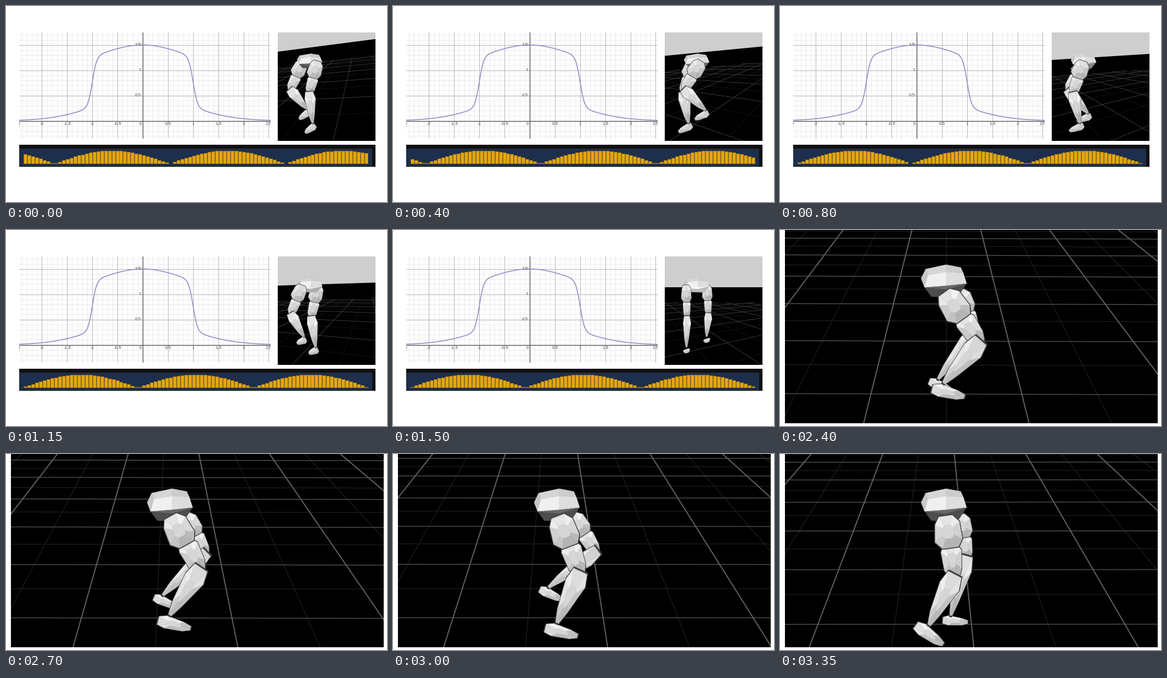
Animation of 694 by 356 pixels, one loop 3.4 s. Source, as a matplotlib script:

```python
import numpy as np
import matplotlib.pyplot as plt
from matplotlib.animation import FuncAnimation
from matplotlib.collections import LineCollection, PolyCollection
from matplotlib.patches import Rectangle

W, H, DPI = 694, 356, 100
FRAMES, STEP, CUT = 68, 50, 1700
PT = 72 / DPI

plt.rcParams["font.family"] = "Liberation Sans"
fig = plt.figure(figsize=(W / DPI, H / DPI), dpi=DPI, facecolor="white")
ax = fig.add_axes([0, 0, 1, 1])
ax.set(xlim=(0, W), ylim=(H, 0))
ax.axis("off")

intro = []      # artists seen only before the cut
closeup = []    # artists seen only after the cut


def box(group, x0, y0, x1, y1, color, z=1):
    patch = Rectangle((x0, y0), x1 - x0, y1 - y0, fc=color, lw=0, zorder=z)
    ax.add_patch(patch)
    group.append(patch)
    return patch


def collect(group, clip, art):
    ax.add_collection(art, autolim=False)
    art.set_clip_path(clip)
    group.append(art)
    return art


def polys(group, clip, z, **style):
    return collect(group, clip, PolyCollection([], zorder=z, **style))


def lines(group, clip, z, color, width):
    return collect(group, clip, LineCollection(
        [], colors=color, linewidths=width * PT, zorder=z))


# ---- plot of the reward curve -------------------------------------------

UNIT, X0, Y0 = 91.8, 249, 208.5
plot = box(intro, 24, 48, 482, 241, "white")


def rule(xs, ys, color, width, z):
    line, = ax.plot(xs, ys, color=color, lw=width * PT, zorder=z)
    line.set_clip_path(plot)
    intro.append(line)


def plot_label(x, y, text, align):
    label = ax.text(x, y, text, size=8 * PT, color="#444444", ha=align,
                    va="center", zorder=4, clip_on=True)
    label.set_clip_path(plot)
    intro.append(label)


for k in range(-25, 26):
    major = k % 5 == 0
    style = ("#b4b4b4", 1, 2.2) if major else ("#e6e6e6", 0.8, 2)
    if k == 0:
        style = ("#4a4a4a", 1.3, 2.4)
    rule([X0 + k * UNIT / 10] * 2, [48, 241], *style)
    if -3 <= k <= 17:
        rule([24, 482], [Y0 - k * UNIT / 10] * 2, *style)
    if major:
        shift = -4 if k == 0 else 0
        plot_label(X0 + k * UNIT / 10 + shift, 215, f"{k / 10:g}", "center")
        if 0 < k <= 15:
            plot_label(246, Y0 - k * UNIT / 10, f"{k / 10:g}", "right")

x = np.linspace(-2.5, 2.6, 600)
y = 0.5 * np.exp(-x**2 / 1.6) + 1 / (1 + np.exp(23 * (np.abs(x) - 1)))
rule(X0 + UNIT * x, Y0 - UNIT * y, "#8a83c0", 1.5, 3)

# ---- travelling bars ----------------------------------------------------

box(intro, 24, 252, 673, 291.5, "#101010")
strip = box(intro, 24, 259, 667, 290.5, "#1d2f4c", 1.1)
bars = polys(intro, strip, 2, facecolors="#e6a610", edgecolors="#8d6d20",
             linewidths=0.8 * PT)
BAR_X = 32 + 6.98 * np.arange(90)


def draw_bars(t):
    zero = 88 - 0.598 * t
    tall = 23.5 * np.abs(np.sin(np.pi * (BAR_X + 3 - zero) / 210))
    bars.set_verts([[(a, 286), (a, 286 - b), (a + 6, 286 - b), (a + 6, 286)]
                    for a, b in zip(BAR_X, tall) if b > 0.8])


# ---- faceted body -------------------------------------------------------

SIDES = 8
LIGHT = np.exp(-1.95j)
rng = np.random.default_rng(4)
RIM_NOISE = rng.uniform(0.92, 1.08, SIDES)
SHADE_NOISE = rng.uniform(-0.05, 0.05, SIDES)


def face(points, shade):
    points = np.asarray(points)
    return np.column_stack([points.real, points.imag]), shade


def hull(start, end, wide, narrow, reach=0.06):
    """Low-poly solid around a bone: dark rim, ring of facets, flat core."""
    phi = 2 * np.pi * (np.arange(SIDES) + 0.5) / SIDES
    c, s = np.cos(phi), np.sin(phi)
    along = 0.5 - (0.5 + reach) * np.sign(c) * np.abs(c) ** 0.7
    across = np.sign(s) * np.abs(s) ** 0.6 * RIM_NOISE
    across = across * (wide + (narrow - wide) * along)
    bone = end - start
    rim = start + along * bone + 1j * across * bone / (abs(bone) + 1e-6)
    center = rim.mean()
    core = center + 0.42 * (rim - center)
    yield face(center + 1.06 * (rim - center), 0.25)
    for i in range(SIDES):
        j = (i + 1) % SIDES
        out = (rim[i] + rim[j]) / 2 - center
        facing = (out / abs(out) * np.conj(LIGHT)).real
        yield face([rim[i], rim[j], core[j], core[i]],
                   0.81 + 0.1 * facing + SHADE_NOISE[i])
    yield face(core, 0.84)


def leg(hip, knee, ankle, heel, toe, width, sole):
    mid = hip + 0.45 * (knee - hip)
    return [*hull(heel, toe, 13 * sole, 7 * sole),
            *hull(mid, knee, 20 * width, 15 * width),
            *hull(knee, ankle, 23 * width, 6 * width),
            *hull(hip, mid, 22 * width, 26 * width, 0.15)]


def bend(hip, ankle, thigh, shin):
    """Knee of a two-bone leg; the knee points to positive real."""
    reach = ankle - hip
    span = min(abs(reach), thigh + shin - 0.1)
    along = (thigh**2 + span**2 - shin**2) / (2 * span)
    out = np.sqrt(max(thigh**2 - along**2, 0))
    return hip + reach / abs(reach) * (along - 1j * out)


def pelvis(center, width, height, under):
    back, front = -1 + .1j, 1 + .55j
    top = [-.8 - .75j, .1 - 1.15j, .74 - .9j, .85 - .4j]
    ridge = [-.7 - .2j, .13 - .5j]
    base = [-.85 + .9j, .1 + .75j]
    shapes = [([*base, front, .6 + 1.8j, -.55 + 1.75j], under),
              ([*base, front, .1 + 1.1j], under * 1.35),
              ([*top[:2], *ridge[::-1]], .84),
              ([*top[1:], ridge[1]], .8),
              ([back, top[0], ridge[0], base[0]], .78),
              ([*ridge, *base[::-1]], .94),
              ([ridge[1], top[3], front, base[1]], .87)]
    for points, shade in shapes:
        points = np.array(points)
        yield face(center + width * points.real + 1j * height * points.imag,
                   min(shade, 1))


def paint(art, faces):
    shades = [str(np.clip(shade, 0, 1)) for _, shade in faces]
    art.set_verts([outline for outline, _ in faces])
    art.set_facecolor(shades)
    art.set_edgecolor(shades)


# ---- small view: camera circles the walker ------------------------------

view = box(intro, 495, 48, 673, 245, "black")
floor_dim = lines(intro, view, 2, "#151515", 0.8)
floor_lit = lines(intro, view, 2.1, "#444444", 0.8)
sky = polys(intro, view, 2.2, facecolors="#cecece", linewidths=0)
walker = polys(intro, view, 3, linewidths=0.4 * PT)
GAIT = 710


def floor_lines(angle, left, right, offset):
    """Project evenly spaced floor lines in both directions."""
    along = np.linspace(-30, 30, 500)
    turn = np.exp(1j * np.radians(angle))
    out = []
    for k in range(-9, 10):
        across = 1.15 * (k + offset)
        for point in (across + 1j * along, along + 1j * across):
            point = point * np.conj(turn)
            depth = np.where(point.imag > 0.4, point.imag, np.nan)
            sx = 584 + 250 * point.real / depth
            sy = left + (right - left) * (sx - 495) / 178 + 250 / depth
            seen = np.isfinite(sx) & (depth < 9)
            if seen.sum() > 1:
                out.append(np.column_stack([sx, sy])[seen])
    return out


def walker_leg(t, side, yaw):
    """Side 1 is the left leg, -1 the right; both swing half a cycle apart."""
    swing = 2 * np.pi * t / GAIT
    lift = max(0, -side * np.cos(swing))
    hip = 0
    ankle = -side * 12 * np.sin(swing - 1.25) + 1j * (108 - 25 * lift)
    knee = bend(hip, ankle, 58, 54)

    def place(point):
        return (553 + 19 * side * np.cos(yaw) - point.real * np.sin(yaw)
                + 1j * (103 + point.imag))

    heel, toe = ankle - 6 + 6j, ankle + 18 + 1j * (16 + 4 * np.cos(yaw))
    return leg(*map(place, (hip + 0j, knee, ankle, heel, toe)),
               0.34 + 0.24 * abs(np.sin(yaw)), 0.55)


def draw_walker(t):
    turn, left, right = (np.interp(t, [0, 800, 1500], values) for values in
                         ([45, 95, 185], [83, 98, 104], [60, 87, 104]))
    yaw = np.radians(turn)
    sky.set_verts([[(495, 48), (673, 48), (673, right), (495, left)]])
    floor_lit.set_segments(floor_lines(turn - 123, left, right, 0.2))
    floor_dim.set_segments(floor_lines(turn - 123, left, right, 0.7))
    paint(walker, [*walker_leg(t, -1, yaw),
                   *pelvis(553 + 97j, 23, 9, 0.5 - 0.24 * np.cos(yaw)),
                   *walker_leg(t, 1, yaw)])


# ---- large view: tracking shot from the side ----------------------------

stage = box(closeup, 9, 0, 688.5, 350.5, "black")
grid_dim = lines(closeup, stage, 2, "#1c1c1c", 1.4)
grid_rows = lines(closeup, stage, 2.1, "#505050", 1.4)
grid_columns = lines(closeup, stage, 2.1, "#606060", 2)
runner = polys(closeup, stage, 3, linewidths=0.4 * PT)

STRIDE = [1600, 1950, 2400, 3000, 3350]
NEAR_ANKLE = [300 + 304j, 283 + 300j, 300 + 276j, 300 + 304j, 273 + 308j]
FAR_ANKLE = [286 + 240j, 330 + 257j, 290 + 268j, 286 + 240j, 312 + 290j]
# horizon, vanishing x, row gap, height of one row, column offset
CAMERA = {1950: (-318, 340, 3.42e-4, 187, .53),
          2400: (-250, 303, 3.88e-4, 202, .5),
          3000: (-278, 293, 3.52e-4, 200.5, .328),
          3350: (-270, 290, 3.57e-4, 210, .21)}


def stage_lines(t, half):
    """Columns fan out from the vanishing point; rows are even in 1/depth."""
    horizon, vanish, gap, row, offset = (
        np.interp(t, list(CAMERA), track) for track in zip(*CAMERA.values()))
    spread = 0.437 + 0.00095 * (horizon + 318)
    tilt = (vanish - 292) * 0.00025
    columns, rows = [], []
    for k in range(-7, 8):
        slope = spread * (k + offset + half)
        columns.append([(vanish + slope * (sy - horizon), sy)
                        for sy in (0, 351)])
        inverse = 1 / (row - horizon) + gap * (k + half)
        if inverse > 0:
            sy = horizon + 1 / inverse
            rows.append([(sx, sy + tilt * (sx - 349)) for sx in (9, 689)])
    return columns, rows


def runner_leg(t, ankles, hip, thigh, shin, size):
    ankle = np.interp(t, STRIDE, ankles)
    knee = bend(hip, ankle, thigh, shin)
    # The foot tips further down the more it trails behind.
    foot = np.exp(1j * np.radians(35 + 0.78 * (300 - ankle.real)))
    heel = ankle + foot * size * (-10 + 22j)
    toe = ankle + foot * size * (43 + 2j)
    return leg(hip, knee, ankle, heel, toe, size, size)


def draw_runner(t):
    columns, rows = stage_lines(t, 0)
    grid_columns.set_segments(columns)
    grid_rows.set_segments(rows)
    grid_dim.set_segments(sum(stage_lines(t, 0.5), []))
    paint(runner, [
        *runner_leg(t, FAR_ANKLE, 328 + 114j, 76, 105, 0.75),
        *pelvis(298.5 + 86j, 41.5, 20, 0.3),
        *runner_leg(t, NEAR_ANKLE, 303 + 118j, 105, 97, 1)])


def draw(frame):
    t = frame * STEP
    first = t < CUT
    for artist in intro:
        artist.set_visible(first)
    for artist in closeup:
        artist.set_visible(not first)
    if first:
        draw_bars(t)
        draw_walker(t)
    else:
        draw_runner(t)
    return intro + closeup


animation = FuncAnimation(fig, draw, frames=FRAMES, interval=STEP,
                          init_func=lambda: draw(0), repeat=True,
                          repeat_delay=0, blit=False)
plt.show()
```
